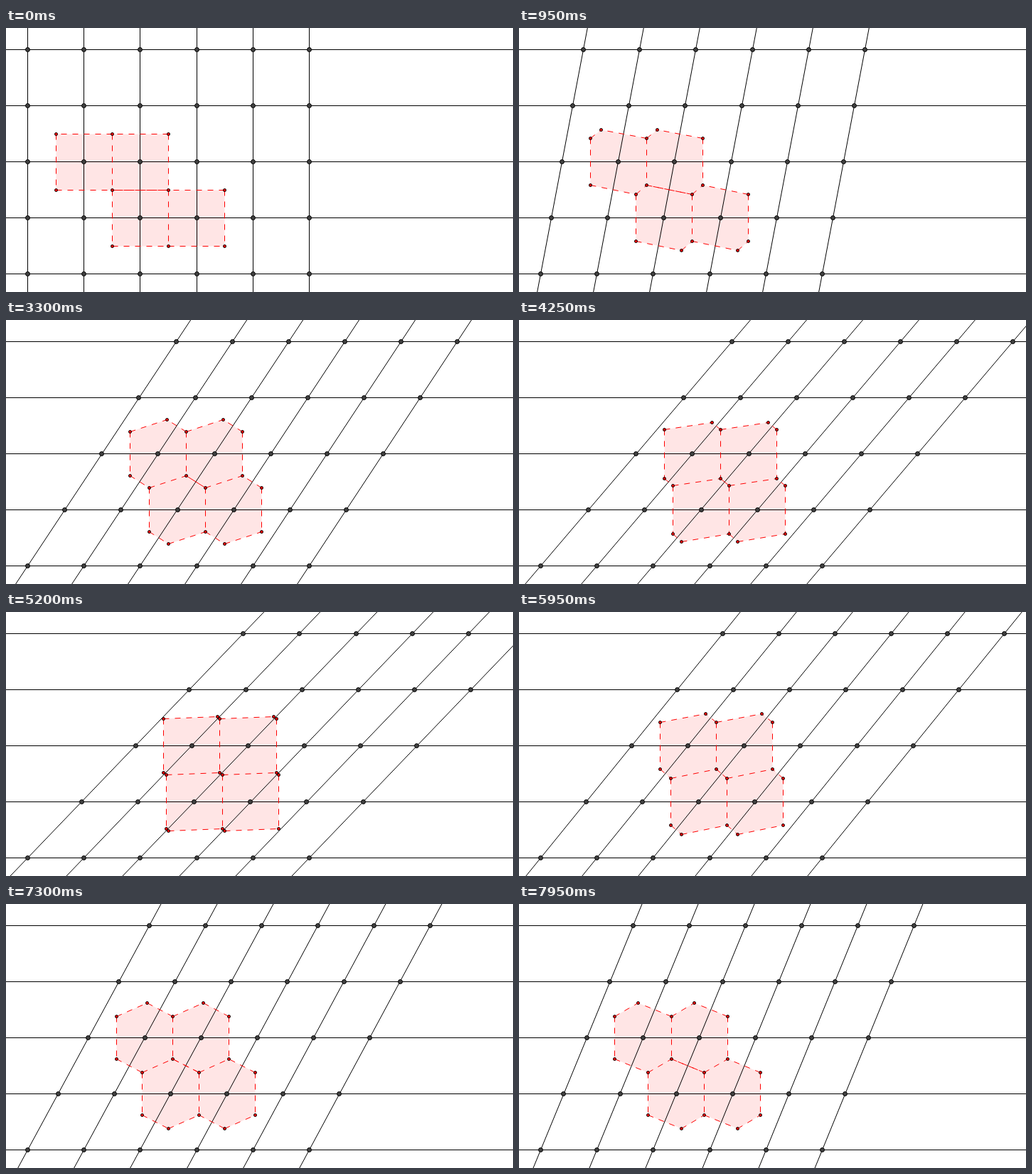
These frames come from a looping animation (713x372 px, 8 s). An HTML page:

```html
<!DOCTYPE html>
<html>
<head>
<meta charset="utf-8">
<style>
html, body { margin: 0; width: 100%; height: 100%; overflow: hidden; background: #fff; }
svg { display: block; }
</style>
</head>
<body>
<svg width="713" height="372" viewBox="0 0 713 372">
  <path id="fill" fill="#f00" fill-opacity=".1"/>
  <path id="grid" fill="none" stroke="#000"/>
  <path id="edges" fill="none" stroke="#f00" stroke-dasharray="8 8"/>
  <path id="nodes" fill="#404040" stroke="#000"/>
  <path id="corners" fill="#f00" stroke="#000"/>
</svg>
<script>
const STEP = 50, STEPS = 160, PEAK = 100;
const X0 = 30.6, Y0 = 346.5, DX = 79.15, DY = 78.95;
const COLS = 6, ROWS = 5, W = 713, H = 372;
const CELLS = [[1, 2], [2, 2], [2, 1], [3, 1]];

const snap = v => Math.floor(v + 1e-6) + 0.5;
const put = (id, d) => document.getElementById(id).setAttribute('d', d);
const line = (a, b) => `M${a}L${b}`;
const dot = ([x, y], r) =>
  `M${x - r} ${y}a${r} ${r} 0 1 0 ${2 * r} 0a${r} ${r} 0 1 0 ${-2 * r} 0z`;

// Lattice point in column i, row j counted from the bottom, sheared by k.
const lattice = (i, j, k) => [X0 + DX * i + k * DY * j, Y0 - DY * j];

// Voronoi cell: corners are circumcentres of the neighbouring triangles.
function cell([i, j], k) {
  const [cx, cy] = lattice(i, j, k);
  const h = DX / 2, tip = k * DY - h;
  const u = DY * (1 - k + k * k) / 2, v = DY * (1 + k - k * k) / 2;
  return [[-h, -u], [tip, -v], [h, -u], [h, u], [-tip, v], [-h, u]]
    .map(([x, y]) => [snap(cx + x), snap(cy + y)]);
}

function draw(k) {
  let grid = '', nodes = '', fill = '';
  const edges = new Set(), corners = new Map();

  for (let j = 0; j < ROWS; j++) {
    const y = snap(Y0 - DY * j);
    grid += line([0, y], [W, y]);
  }
  for (let i = 0; i < COLS; i++) {
    const [bx, by] = lattice(i, 0, k).map(snap);
    const [tx, ty] = lattice(i, ROWS - 1, k).map(snap);
    const at = y => bx + (tx - bx) * (by - y) / (by - ty);
    grid += line([at(-5), -5], [at(H + 5), H + 5]);
    for (let j = 0; j < ROWS; j++) nodes += dot(lattice(i, j, k).map(snap), 3);
  }
  for (const c of CELLS) {
    const p = cell(c, k);
    fill += `M${p.join('L')}z`;
    // Shared edges run the same way, except the one whose dashes interlock.
    for (const [a, b] of [[0, 1], [2, 1], [2, 3], [0, 5], [5, 4], [4, 3]])
      edges.add(line(p[a], p[b]));
    for (const q of p) corners.set(String(q), q);
  }

  put('grid', grid);
  put('nodes', nodes);
  put('fill', fill);
  put('edges', [...edges].join(''));
  put('corners', [...corners.values()].map(q => dot(q, 2)).join(''));
}

const start = performance.now();
function tick() {
  const n = Math.floor(Math.max(0, performance.now() - start) / STEP) % STEPS;
  draw((PEAK - Math.abs(PEAK - n)) / PEAK);
  requestAnimationFrame(tick);
}
tick();
</script>
</body>
</html>
```
